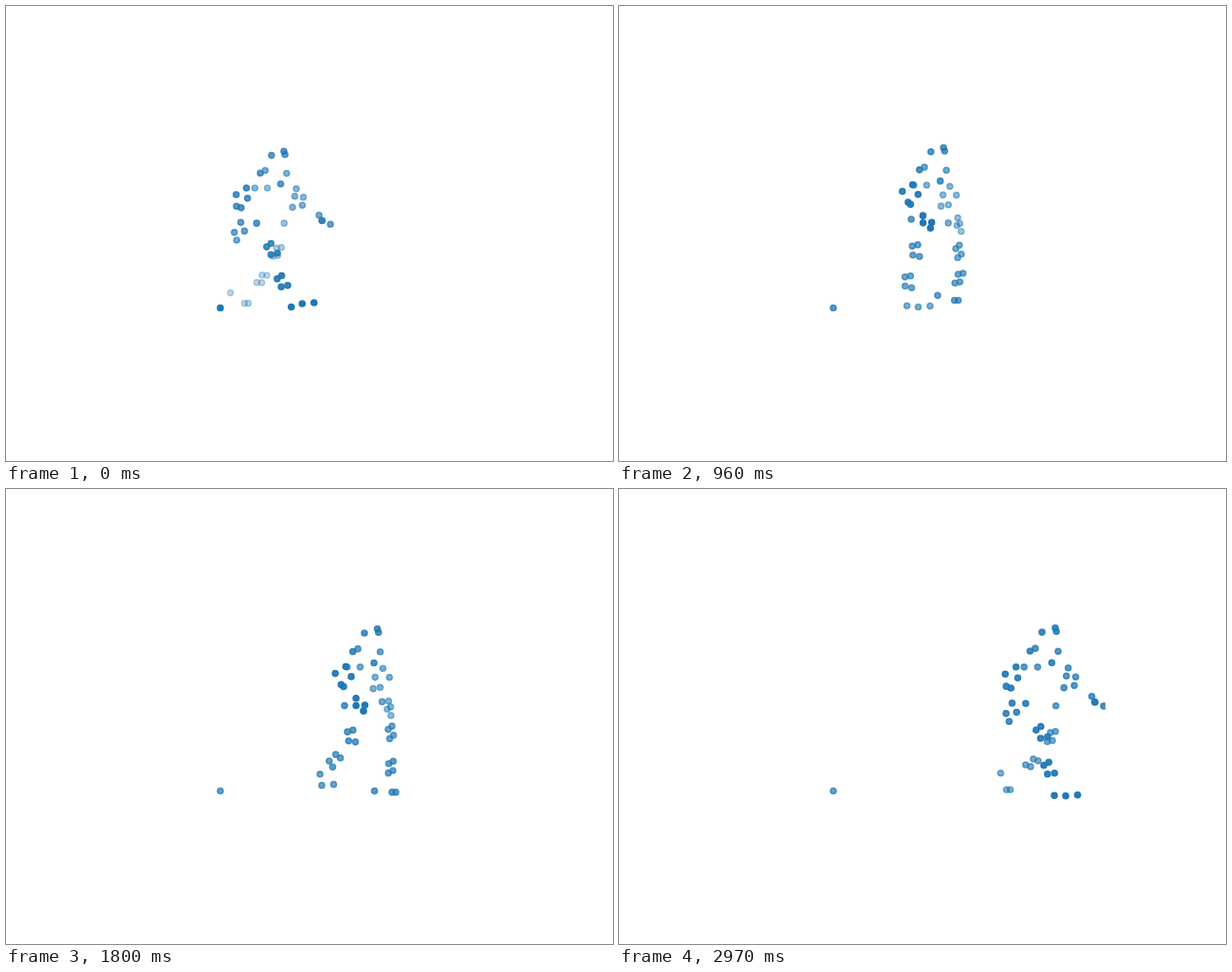
Write an HTML page with a canvas that moves like this. It is 640x480 px and loops after 3000 ms.

```html
<!DOCTYPE html>
<html lang="en">
<head>
<meta charset="utf-8">
<title>Walking markers</title>
<style>
  html, body { margin: 0; width: 100%; height: 100%; overflow: hidden; background: #fff; }
  canvas { display: block; }
</style>
</head>
<body>
<canvas id="stage" width="640" height="480"></canvas>
<script>
const LOOP = 3000, STEP = 30, CYCLE = 2740;
const HORIZON = 242, STRIDE = 155.5;
const { sin, cos, abs, exp, PI } = Math;
const RAD = PI / 180;
const ctx = document.getElementById('stage').getContext('2d');

// Head and back: offset from the crown, then opacity.
const trunk = [
  [-13.5, 4.4, .73], [0, 0, .74], [1.2, 3.6, .7],
  [-25.7, 23.7, .76], [-20.4, 20.9, .6], [3, 24, .56],
  [-3.5, 35.6, .74], [-18, 40, .48], [-31.7, 40, .53]
];

// Arms: offset from the crown, then reach of the swing.
const arms = [
  { shade: .85, swing: p => cos(p) - .3 * sin(p) ** 2, dots: [
    [-36.5, 39.7, 4.4], [-47.5, 46.9, 4.5], [-32.7, 50.5, 7], [-43.9, 59, 7.8], [-40.2, 61, 6.4],
    [-33, 74.7, 14], [-36, 83.9, 18], [-26, 82.9, 17], [-30.5, 90.7, 21]] },
  { shade: .47, swing: p => cos(p - .15), dots: [
    [8.9, 41.2, -4.7], [3.4, 50, -8.6], [16.1, 50.5, -5.2], [1.2, 62, -8.3], [9.9, 60.3, -10.3],
    [22.5, 73.2, -16], [23, 80.7, -19], [25, 79.2, -16.5], [29, 86.2, -22]] }
];

// Legs share one gait, half a cycle apart; side is -1 near, 1 far.
const legs = [
  { side: -1, phase: 0, start: 160, foot: 12, toe: [12.5, -1], ground: 304.9,
    cuff: [[-5.3, -2.9], [-.6, -6.6], [-.6, 5.6], [6.4, 3.9]] },
  { side: 1, phase: PI, start: 96, foot: 18.5, toe: [4, 0], ground: 303.6,
    cuff: [[-3, -3], [.8, -6.7], [-.8, 6.6], [3, 2.8]] }
];

// Gait curves over the phase a.
const kneeX = a => -7.75 + 12 * cos(a) - sin(a) - 2.75 * cos(2 * a);
const kneeY = a => 16.7 - 2 * cos(a - .87);
const shinX = a => -13.1 + 25 * cos(a) + 2 * sin(a) - 2.5 * sin(2 * a);
const shinY = a => 47.9 + 1.5 * cos(a) + 3.4 * sin(a) + 1.1 * cos(2 * a);
const kneeTurn = a => 1.55 * (1.5 - kneeX(a));
const shinTurn = a => 34.5 - 23 * cos(a) - 20 * sin(a) - 9.5 * cos(2 * a) + 7 * sin(2 * a);

// Smooth bump around a phase in degrees, wrapping each cycle.
function bump(a, centre, width) {
  const d = (((a / RAD - centre) % 360) + 540) % 360 - 180;
  return exp(-((d / width) ** 2));
}
const pitch = a => 62 * bump(a, 232, 56) - 20 * bump(a, 350, 25);

function dot(x, y, alpha) {
  ctx.globalAlpha = Math.max(.3, Math.min(1, alpha));
  ctx.beginPath();
  ctx.arc(x, y, 3.1, 0, PI * 2);
  ctx.fill();
  ctx.stroke();
}

function drawFoot(leg, a, put) {
  const q = (a / RAD + 160) / 360, n = Math.floor(q);
  const u = Math.min(1, (q - n) * 360 / 175);
  const x = leg.start + STRIDE * (n + u * u * (3 - 2 * u));
  const lift = u < 1 ? 7.5 * sin(PI * u) ** .6 : 0;
  const y = leg.ground + .04 * x - lift;
  const turn = (1.25 * pitch(a) + 4) * RAD;
  put(x, y);
  put(x + leg.toe[0], y + leg.toe[1]);
  put(x - leg.foot * cos(turn), y - leg.foot * sin(turn));
}

function draw(t) {
  const p = 2 * PI * t / CYCLE, done = t / LOOP;
  const zoom = .967 + .066 * done;
  const rootX = 293 + .0505 * t + 2e-6 * t * t - 1.4 * sin(p);
  const headY = -93.2 + 1.5 * cos(2 * p);
  const fade = a => 1 - (1 - a) * (1 - .45 * done);
  const body = (x, y, a) => dot(rootX + x * zoom, HORIZON + y * zoom, fade(a));

  ctx.clearRect(0, 0, 640, 480);
  dot(226, 318.5, 1 - .3 * (1 - exp(-t / 600)));

  for (const [x, y, a] of trunk) body(x, headY + y, a);

  for (const { shade, swing, dots } of arms) {
    const w = swing(p);
    for (const [x, y, z] of dots)
      body(x - z * w, headY + y + .014 * z * abs(z) * w, shade - .01 * z * w);
  }

  for (const leg of legs) {
    const { side, cuff } = leg, a = p + leg.phase;
    const shade = reach => .6 - .11 * side + reach * cos(a);
    const ring = (x, y, turn, alpha) => {
      const c = cos(turn * RAD), s = sin(turn * RAD);
      for (const [u, v] of cuff) body(x + u * c - v * s, y + u * s + v * c, alpha);
    };
    body(-14.7 + 18 * side + 3 * cos(a), headY + 78.4 - 2.5 * sin(a), shade(.05));
    ring(kneeX(a) + 15 * side, kneeY(a), kneeTurn(a), shade(.12));
    ring(shinX(a) + 14 * side, shinY(a), shinTurn(a), shade(.2));
    drawFoot(leg, a, (x, y) => dot(x, y, fade(shade(.28))));
  }
}

ctx.fillStyle = ctx.strokeStyle = '#1f77b4';
ctx.lineWidth = 1.39;
// The plot area ends here, cutting the leading hand at the end of the walk.
ctx.beginPath();
ctx.rect(143, 58, 369.8, 370);
ctx.clip();

const start = performance.now();
function tick() {
  const t = (performance.now() - start) % LOOP;
  draw(Math.floor(t / STEP) * STEP);
  requestAnimationFrame(tick);
}
tick();
</script>
</body>
</html>
```
